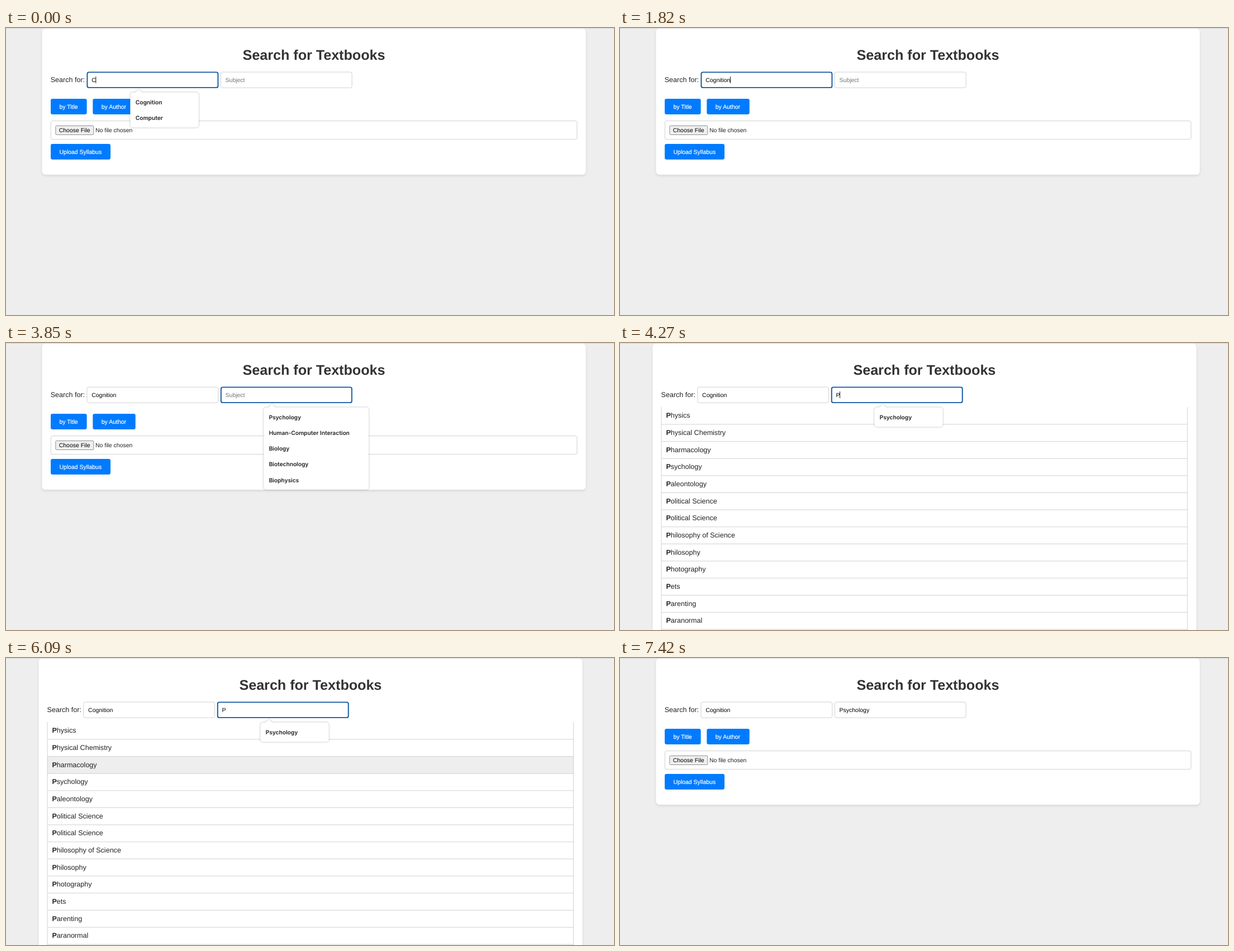
An HTML page that plays this animation: 1088x515 px, repeating every 8 s.

```html
<!DOCTYPE html>
<html lang="en">
<head>
<meta charset="utf-8">
<title>Search for Textbooks</title>
<style>
  html, body { margin: 0; width: 100%; height: 100%; overflow: hidden; background: #eee; }
  svg { display: block; width: 1088px; height: 515px; }
  text {
    font-family: "Liberation Sans", Arial, sans-serif;
    font-variant-ligatures: none;
    text-rendering: geometricPrecision;
    white-space: pre;
  }
  .body { font-size: 12.56px; fill: #222; }
  .small { font-size: 10.47px; }
  .label { fill: #fff; stroke: #fff; stroke-width: .2px; }
  .item { font: 600 10.2px Inter, sans-serif; fill: #1f1f1f; }
  .line { fill: none; stroke: #ccc; stroke-width: .9px; }
  .card { filter: drop-shadow(0 2px 2px rgba(0, 0, 0, .1)); }
  .popup { filter: drop-shadow(0 .8px 1.4px rgba(0, 0, 0, .32)); }
</style>
</head>
<body>
<svg id="stage" viewBox="0 0 1088 515"></svg>
<script>
const LOOP = 8000;
const ROW = 30.66, LIST_TOP = 115;
const WORD = "Cognition";
const KEY_TIMES = [0, 210, 700, 1050, 1260, 1540, 1610, 1680, 1820];
const FOCUS_SUBJECT = 3290, LIST_OPEN = 4270, BLUR = 7280, PICK = 7350;
const CARET_OFF = [[2310, 2870], [3850, 4270], [4760, 5320], [5810, 6370], [6930, 7280]];
const HOVER_TIMES = [5390, 5880, 6090, 6510];
const SUBJECTS = ["Physics", "Physical Chemistry", "Pharmacology", "Psychology",
  "Paleontology", "Political Science", "Political Science", "Philosophy of Science",
  "Philosophy", "Photography", "Pets", "Parenting", "Paranormal"];

const stage = document.getElementById("stage");

function add(parent, tag, attrs = {}, content) {
  const node = document.createElementNS("http://www.w3.org/2000/svg", tag);
  for (const key in attrs) node.setAttribute(key, attrs[key]);
  if (content !== undefined) node.textContent = content;
  parent.appendChild(node);
  return node;
}
const box = (parent, x, y, width, height, rx, attrs) =>
  add(parent, "rect", { x, y, width, height, rx, ...attrs });
const write = (parent, x, y, style, content, attrs) =>
  add(parent, "text", { x, y, class: style, ...attrs }, content);
const show = (node, on) => node.setAttribute("visibility", on ? "visible" : "hidden");
const passed = (times, t) => times.filter(at => t >= at).length;

box(stage, 0, 0, 1088, 515, 0, { fill: "#eee" });
const page = add(stage, "g");
const card = box(page, 64.5, 1, 973, 262.3, 6.3, { fill: "#fff", class: "card" });
box(stage, 0, 0, 1088, 1, 0, { fill: "#d2d2d2" });

write(page, 551, 57.4, "", "Search for Textbooks",
  { "font-size": 25.12, "font-weight": 700, fill: "#333", "text-anchor": "middle" });
write(page, 79.7, 96.9, "body", "Search for:");

function makeField(x) {
  const frame = box(page, x, 79.1, 234.8, 28.1, 3, { class: "line" });
  const ring = box(page, x + .5, 79.4, 234, 27.5, 3,
    { fill: "none", stroke: "#0f55a3", "stroke-width": 1.9 });
  const text = write(page, x + 8.3, 96.8, "small", "");
  const caret = box(page, 0, 87, .9, 12, 0, { fill: "#000" });
  return (value, focused, caretOn, hint = "") => {
    show(frame, !focused);
    show(ring, focused);
    show(caret, focused && caretOn);
    text.textContent = value || hint;
    text.setAttribute("fill", value ? "#000" : "#757575");
    const end = value ? text.getComputedTextLength() : 0;
    caret.setAttribute("x", x + 8.2 + end - .3);
  };
}
const setTitle = makeField(144.9);
const setSubject = makeField(384.3);

// Buttons and file picker
const form = add(page, "g");
function button(x, y, width, label) {
  box(form, x, y, width, 27.8, 3.1, { fill: "#007bff" });
  write(form, x + 15.5, y + 17.7, "small label", label);
}
button(80, 127.1, 64.6, "by Title");
button(155.3, 127.1, 76.4, "by Author");
button(80, 208.1, 107, "Upload Syllabus");
box(form, 80.3, 166.7, 941.6, 33.1, 3, { class: "line" });
box(form, 88.8, 175.4, 68, 16.1, 1.8, { fill: "#efefef", stroke: "#767676", "stroke-width": .8 });
write(form, 94.7, 187.1, "small", "Choose File", { fill: "#000" });
write(form, 160, 187.1, "small", "No file chosen", { fill: "#222" });

// Subject list
const list = add(page, "g");
const hover = box(list, 80, 0, 941.6, ROW, 0, { fill: "#eee" });
SUBJECTS.forEach((name, i) => {
  const line = write(list, 88.5, 134.4 + i * ROW, "body", "");
  add(line, "tspan", { "font-weight": 700 }, name[0]);
  add(line, "tspan", {}, name.slice(1));
  const y = LIST_TOP + .5 + (i + 1) * ROW - .2;
  add(list, "path", { d: `M80 ${y}H1021.6`, class: "line" });
});
add(list, "path", { d: `M80.2 ${LIST_TOP}V515M1021.5 ${LIST_TOP}V515`, class: "line" });

// Autofill popups
function makePopup(x, width, items) {
  const group = add(page, "g");
  const height = 6.6 + items.length * 28.2;
  const shape = add(group, "g", { class: "popup", fill: "#fff" });
  box(shape, x, 115.6, width, height, 5);
  add(shape, "path", { d: `M${x + 8.5} 116L${x + 15} 109.8L${x + 21.5} 116Z` });
  items.forEach((item, i) => write(group, x + 9.4, 136.7 + i * 28.2, "item", item));
  return group;
}
const bothTitles = makePopup(222.3, 122.5, ["Cognition", "Computer"]);
const oneTitle = makePopup(222.3, 122.5, ["Cognition"]);
const allSubjects = makePopup(461, 188,
  ["Psychology", "Human-Computer Interaction", "Biology", "Biotechnology", "Biophysics"]);
const oneSubject = makePopup(461.3, 122.5, ["Psychology"]);

function draw(t) {
  const listOpen = t >= LIST_OPEN && t < PICK;
  const caretOn = !CARET_OFF.some(([from, to]) => t >= from && t < to);
  page.setAttribute("transform", `translate(${listOpen ? -6.1 : 0} 0)`);
  card.setAttribute("height", listOpen ? 600 : 262.3);

  setTitle(WORD.slice(0, passed(KEY_TIMES, t)), t < FOCUS_SUBJECT, caretOn);
  const subject = t >= PICK ? "Psychology" : t >= LIST_OPEN ? "P" : "";
  setSubject(subject, t >= FOCUS_SUBJECT && t < BLUR, caretOn, "Subject");

  show(form, !listOpen);
  show(list, listOpen);
  const row = passed(HOVER_TIMES, t) - 1;
  hover.setAttribute("y", LIST_TOP + .4 + row * ROW);
  show(hover, listOpen && row >= 0);

  show(bothTitles, t < 770);
  show(oneTitle, t >= 770 && t < 1820);
  show(allSubjects, t >= FOCUS_SUBJECT && t < LIST_OPEN);
  show(oneSubject, t >= LIST_OPEN && t < BLUR);
}

const start = performance.now();
function tick() {
  draw((performance.now() - start) % LOOP);
  requestAnimationFrame(tick);
}
tick();
</script>
</body>
</html>
```
